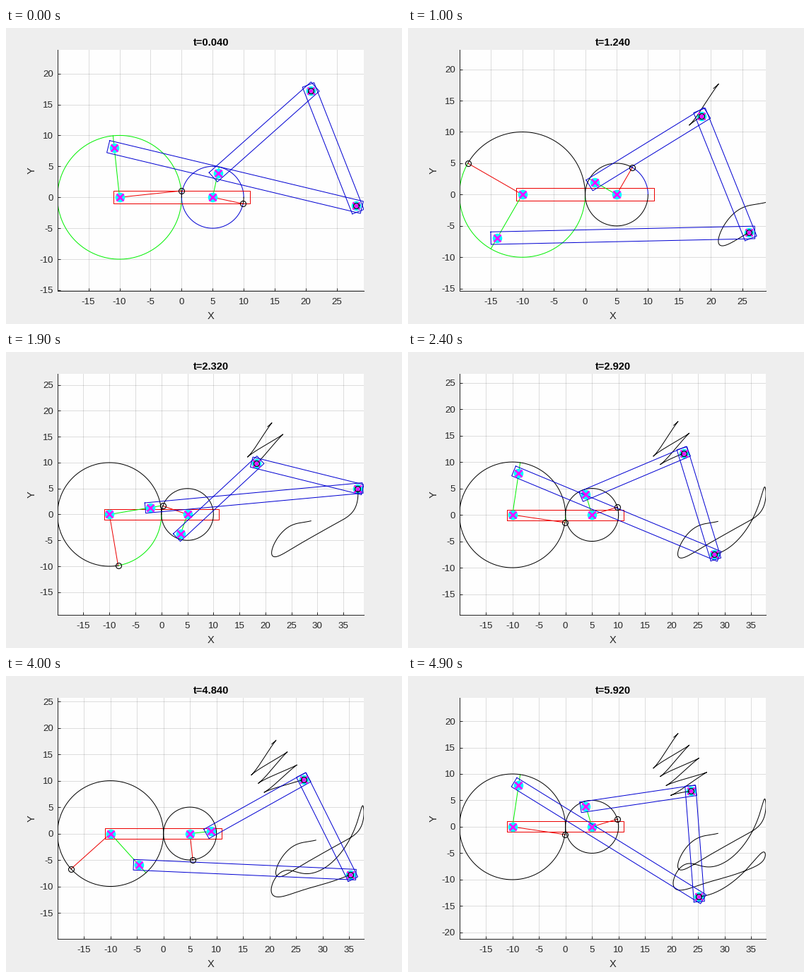
A matplotlib script for the animation above (5000 ms loop, 560x420 px).

```python
import numpy as np
import matplotlib.pyplot as plt
from matplotlib.animation import FuncAnimation
from matplotlib.ticker import MultipleLocator, FormatStrFormatter

PT = 0.72                      # points per pixel at 100 dpi
WIDTH, HEIGHT = 560, 420
BOX_LEFT, BOX_BOTTOM, BOX_W, BOX_H = 72.8, 46.7, 433.3, 342
FRAMES, INTERVAL = 50, 100
DT = 0.001
OMEGA = 2 * np.pi / 3
BIG_TURN, SMALL_TURN = 3000, 1500      # steps per revolution
GEAR_BIG, GEAR_SMALL = np.array([-10, 0]), np.array([5, 0])
LONG, SHORT = 40, 20
START = 10                             # first traced step of the linkage
DARK, BLUE, RED, GREEN = "#262626", "#0000d2", "#ec0000", "#00f000"

plt.rcParams["font.family"] = "Liberation Sans"


def polar(center, radius, angle):
    return center + radius * np.stack([np.cos(angle), np.sin(angle)], axis=-1)


def rod_angles(phi):
    """The elbow trails the small crank, moving only along its own rod."""
    def rate(p, a):
        return 0.397 * np.sin(a + 2 * p)

    angles = [np.radians(40)]
    step = phi[1] - phi[0]
    for p in phi[:-1]:
        a = angles[-1]
        angles.append(a + step * rate(p + step / 2, a + step / 2 * rate(p, a)))
    return np.array(angles)


def join(a, q):
    """Lower crossing of the circles around a (LONG) and q (SHORT)."""
    d = q - a
    dist = np.hypot(d[:, 0], d[:, 1])[:, None]
    u = d / dist
    along = (LONG**2 - SHORT**2 + dist**2) / (2 * dist)
    height = np.sqrt(LONG**2 - along**2)
    return a + along * u + height * np.stack([u[:, 1], -u[:, 0]], axis=-1)


def bar(p, q):
    """Outline of a bar reaching one unit past both pins."""
    u = (q - p) / np.hypot(*(q - p))
    n = np.array([-u[1], u[0]])
    return np.array([p - u + n, q + u + n, q + u - n, p - u - n, p - u + n])


phi = OMEGA * DT * np.arange(6000)
mark_big = polar(GEAR_BIG, 10, phi)
mark_small = polar(GEAR_SMALL, 5, -2 * phi)
crank_big = phi + np.pi / 2
crank_small = np.pi / 2 - 2 * phi
pin_a = polar(GEAR_BIG, 8, crank_big)
pin_b = polar(GEAR_SMALL, 4, crank_small)
pin_q = polar(pin_b, SHORT, rod_angles(phi))
pin_p = join(pin_a, pin_q)

fig = plt.figure(figsize=(WIDTH / 100, HEIGHT / 100), dpi=100, facecolor="#eeeeee")
ax = fig.add_axes([BOX_LEFT / WIDTH, BOX_BOTTOM / HEIGHT,
                   BOX_W / WIDTH, BOX_H / HEIGHT], facecolor="#fefefe")
ax.set_axisbelow(True)
ax.grid(color=DARK, alpha=0.15, lw=PT)
ax.spines[["top", "right"]].set_visible(False)
ax.spines[["left", "bottom"]].set_color(DARK)
ax.spines[["left", "bottom"]].set_linewidth(PT)
for axis in (ax.xaxis, ax.yaxis):
    axis.set_major_locator(MultipleLocator(5))
    axis.set_major_formatter(FormatStrFormatter("%d"))
ax.tick_params(direction="in", length=4.3 * PT, width=PT, color=DARK,
               labelcolor=DARK, labelsize=13.33 * PT)
ax.tick_params(axis="x", pad=10.2 * PT)
ax.tick_params(axis="y", pad=6 * PT)


def label(x, y, text, **style):
    return fig.text(x / WIDTH, 1 - y / HEIGHT, text, ha="center", va="baseline",
                    fontsize=14.67 * PT, **style)


label(290, 413, "X", color=DARK)
label(41, 202.5, "Y", color=DARK, rotation=90, rotation_mode="anchor")
title = label(290, 25, "", color="black", weight="bold")


def line(color, z=2):
    artist, = ax.plot([], [], color=color, lw=PT, zorder=z)
    return artist


def markers(shape, size, z, **style):
    artist, = ax.plot([], [], ls="none", marker=shape, ms=size * PT, zorder=z, **style)
    return artist


def put(artist, points):
    points = np.asarray(points)
    artist.set_data(points[:, 0], points[:, 1])


rims = [line(GREEN), line(BLUE)]
put(line(RED), [[-11, -1], [11, -1], [11, 1], [-11, 1], [-11, -1]])
cranks = [line(GREEN) for _ in range(2)]
spokes = [line(RED) for _ in range(2)]
bars = [line(BLUE, 5) for _ in range(3)]
paths = [line("black", 4) for _ in range(4)]
discs = markers("o", 13.5, 3, mfc="cyan", mec="none")
crosses = markers("x", 9.5, 6, mec="magenta", mew=2.6 * PT)
rings = markers("o", 8, 7, mfc="none", mec="black", mew=1.1 * PT)


def draw(n):
    t = 0.04 + 0.12 * n
    i = round((t + 0.01) / DT)
    title.set_text(f"t={t:.3f}")
    a, b, p, q = pin_a[i], pin_b[i], pin_p[i], pin_q[i]

    # Each rim turns black where its mark has already passed.
    put(rims[0], mark_big[i:BIG_TURN + 1])
    put(rims[1], mark_small[i:SMALL_TURN + 1])
    put(paths[0], mark_big[max(0, i - BIG_TURN):i + 1])
    put(paths[1], mark_small[max(0, i - SMALL_TURN):i + 1])
    put(paths[2], pin_q[START:i + 1])
    put(paths[3], pin_p[START:i + 1])

    put(cranks[0], [GEAR_BIG, polar(GEAR_BIG, 10, crank_big[i])])
    put(cranks[1], [GEAR_SMALL, polar(GEAR_SMALL, 5, crank_small[i])])
    put(spokes[0], [GEAR_BIG, mark_big[i]])
    put(spokes[1], [GEAR_SMALL, mark_small[i]])

    outlines = [bar(a, p), bar(p, q), bar(b, q)]
    for artist, outline in zip(bars, outlines):
        put(artist, outline)

    pins = [GEAR_BIG, GEAR_SMALL, a, b, p, q]
    put(discs, pins)
    put(crosses, pins)
    put(rings, [mark_big[i], mark_small[i], p, q])

    # Tight horizontal limits, equal scale, data centred vertically.
    extent = np.vstack(outlines + [pin_p[START:i + 1], pin_q[START:i + 1],
                                   [[-19.99, -10], [11, 10]]])
    left, low = extent.min(axis=0)
    right, high = extent.max(axis=0)
    half = (right - left) * BOX_H / BOX_W / 2
    middle = (low + high) / 2
    ax.set_xlim(left, right)
    ax.set_ylim(middle - half, middle + half)
    return []


anim = FuncAnimation(fig, draw, frames=FRAMES, interval=INTERVAL,
                     repeat=True, repeat_delay=0, blit=False)
plt.show()
```
